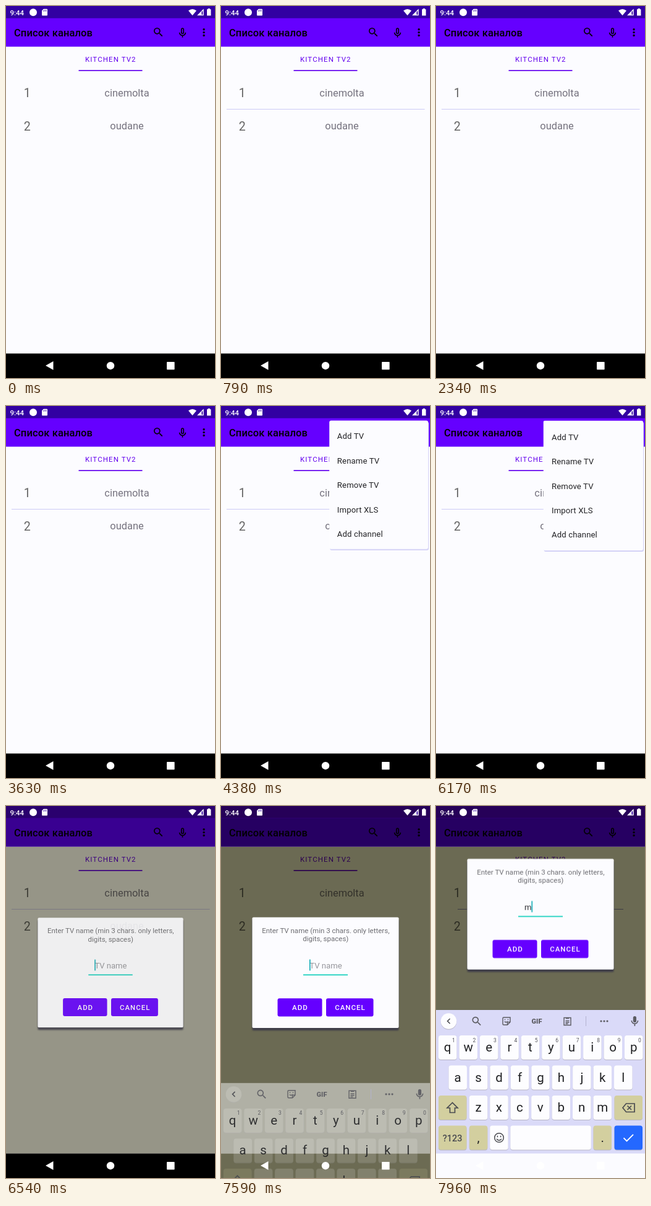
An HTML page for the animation above (8000 ms loop, 338 by 600 pixels).

```html
<!DOCTYPE html>
<html lang="ru">
<head>
<meta charset="utf-8">
<title>Список каналов</title>
<style>
html, body { margin: 0; width: 100%; height: 100%; overflow: hidden; background: #fcfcff; }
svg { display: block; width: 100vw; height: 100vh; }
text { font-family: Roboto, "Noto Sans", sans-serif; white-space: pre; }
.mid { text-anchor: middle; }
.caps { font-size: 11.5px; font-weight: 500; letter-spacing: 1.03px; }
.tab { font-size: 11.5px; letter-spacing: 1.09px; fill: #6200ee; }
.num { font-size: 19.7px; fill: #666; }
.item { font-size: 16.4px; fill: #75727e; }
.menu { font-size: 13.15px; letter-spacing: .12px; fill: #232326; }
.note { font-size: 11.5px; fill: #6d6d72; }
.field { font-size: 13.15px; }
.key { font-size: 20.5px; fill: #202124; }
.hint { font-size: 8.5px; fill: #55555c; }
.line { fill: none; stroke-linecap: butt; }
#dim { mix-blend-mode: multiply; }
#menu { filter: drop-shadow(1.5px 2.5px 0 #d4d2f6); }
#dialog { filter: drop-shadow(0 4px 1px #3f3e49); }
#popIn { transform-origin: 169px 269px; }
#reveal { transform-origin: 0 0; }
</style>
</head>
<body>
<svg viewBox="0 0 338 600" xmlns="http://www.w3.org/2000/svg">
  <defs>
    <clipPath id="menuClip"><rect id="reveal" x="173.5" y="23.5" width="161.5" height="209.5" rx="3"/></clipPath>
    <clipPath id="aboveNav"><rect width="338" height="560.5"/></clipPath>
    <path id="search" d="M15.5 14h-.79l-.28-.27A6.47 6.47 0 0 0 16 9.5 6.5 6.5 0 1 0 9.5 16c1.61 0 3.09-.59 4.23-1.57l.27.28v.79l5 4.99L20.49 19l-4.99-5zm-6 0C7.01 14 5 11.99 5 9.5S7.01 5 9.5 5 14 7.01 14 9.5 11.99 14 9.5 14z"/>
  </defs>

  <g id="app">
    <rect width="338" height="600" fill="#fcfcff"/>
    <rect width="338" height="65.6" fill="#6500ff"/>
    <rect width="338" height="19.7" fill="#3200a2"/>
    <text x="13" y="49" font-size="16.4" font-weight="500" letter-spacing=".15">Список каналов</text>
    <use href="#search" transform="translate(236.5 32.5) scale(.822)"/>
    <g class="line" stroke="#000" stroke-width="1.9" transform="translate(275.6 33.6) scale(.822)">
      <rect x="9.9" y="2.9" width="4.2" height="10.2" rx="2.1"/>
      <path d="M6 11a6 6 0 0 0 12 0M12 17v4"/>
    </g>
    <circle cx="320" cy="37.7" r="1.7"/><circle cx="320" cy="42.6" r="1.7"/><circle cx="320" cy="47.5" r="1.7"/>
    <text class="tab" x="128" y="90">KITCHEN TV2</text>
    <rect x="117.5" y="103.3" width="103" height="1.7" fill="#6200ee"/>
    <text class="num" x="28.8" y="147">1</text>
    <text class="num" x="28.8" y="200.5">2</text>
    <text class="item mid" x="195.5" y="146">cinemolta</text>
    <text class="item mid" x="195.5" y="199.3">oudane</text>
    <rect id="divider" x="9" y="166" width="320.5" height="1" fill="#cdcbf6"/>
  </g>

  <g id="menu"><g clip-path="url(#menuClip)"><g id="menuBody">
    <rect x="173.5" y="23.5" width="161.5" height="209.5" fill="#fcfcff"/>
  </g></g></g>

  <g id="dim">
    <rect width="338" height="19.7" fill="#c2c28a"/>
    <rect y="19.7" width="338" height="45.9" fill="#606062"/>
    <rect y="65.6" width="338" height="495" fill="#6c6b53"/>
  </g>
  <rect id="darkDivider" x="35" y="166" width="268" height="1" fill="#3c3b42"/>

  <g id="status" fill="#fff">
    <text x="6.5" y="14.5" font-size="11.5" font-weight="500">9:44</text>
    <circle cx="44" cy="10.2" r="6"/>
    <path d="M60.8 4.8H66a1 1 0 0 1 1 1V14.5a1 1 0 0 1-1 1H59a1 1 0 0 1-1-1V7.6z"/>
    <path d="M60.6 6.8v2M62.8 6.2v2.6M65 6.2v2.6" stroke="#3200a2" stroke-width=".9"/>
    <path d="M295 7.4Q301.5 2.4 308 7.4L301.5 15.3z"/>
    <path d="M309 15.2L319.6 4.6V15.2z"/>
    <path d="M316.4 9.3V14H318.2V8z" fill="#3200a2"/>
    <path d="M326.6 5.2V4h3.2V5.2h1.6V15.6H325V5.2z"/>
  </g>

  <g id="dialog"><g id="popIn">
    <rect x="50.5" y="179.6" width="237" height="178.4" rx="2" fill="#fcfcff"/>
    <text class="note mid" x="169.3" y="205">Enter TV name (min 3 chars. only letters,</text>
    <text class="note mid" x="169.3" y="218.3">digits, spaces)</text>
    <text id="placeholder" class="field" x="143.2" y="262" fill="#96969c">TV name</text>
    <text id="typed" class="field" x="143" y="262" fill="#333338">m</text>
    <rect id="caret" x="143" y="247.5" width="1.6" height="18" fill="#08a9b4"/>
    <rect x="133" y="271.6" width="72" height="1.6" fill="#03cdb8"/>
    <rect x="91.5" y="310.3" width="72" height="29.3" rx="3" fill="#6500ff"/>
    <rect x="170" y="310.3" width="76.5" height="29.3" rx="3" fill="#6500ff"/>
    <text class="caps mid" x="128" y="329.2" fill="#fff">ADD</text>
    <text class="caps mid" x="209" y="329.2" fill="#fff">CANCEL</text>
  </g></g>

  <g clip-path="url(#aboveNav)"><rect id="panel" y="329" width="338" height="271"/></g>
  <rect id="navBar" y="560.5" width="338" height="39.5"/>
  <g id="keycaps"></g>
  <g id="glyphs"></g>

  <g fill="#fff">
    <path d="M64 580L76.5 573V587z"/>
    <circle cx="169" cy="580.2" r="6.2"/>
    <rect x="260" y="574" width="12.6" height="12.6" rx=".8"/>
  </g>
</svg>
<script>
const LOOP = 8000;
const $ = id => document.getElementById(id);
const add = (id, markup) => $(id).insertAdjacentHTML('beforeend', markup);

// Overflow menu
['Add TV', 'Rename TV', 'Remove TV', 'Import XLS', 'Add channel'].forEach((label, i) =>
  add('menuBody', `<text class="menu" x="187" y="${54.6 + 39.45 * i}">${label}</text>`));

// Keyboard: caps and glyphs fade separately
const PITCH = 33.44, WHITE = '#fdfdff', TAN = '#d3cf9f', EDGE = '#b7b5c6', INK = '#4a4b50', TOOL = '#5c5c62';
const cap = (x, y, w, fill = WHITE) => add('keycaps',
  `<rect x="${x}" y="${y + 1}" width="${w}" height="39" rx="4" fill="${EDGE}"/>
   <rect x="${x}" y="${y}" width="${w}" height="39" rx="4" fill="${fill}"/>`);
const glyph = (cls, ch, x, y) => add('glyphs', `<text class="${cls} mid" x="${x}" y="${y}">${ch}</text>`);
const letter = (ch, x, y, fill) => {
  cap(x, y, 29.5, fill);
  glyph('key', ch, x + 14.7, y + 26);
};
const row = (chars, x, y) => [...chars].forEach((ch, i) => letter(ch, x + PITCH * i, y));
const icon = (d, w = 1.6, color = INK) =>
  add('glyphs', `<path class="line" d="${d}" stroke="${color}" stroke-width="${w}"/>`);

// Tool strip
add('keycaps', `<circle cx="20.5" cy="348" r="12.8" fill="${EDGE}"/><circle cx="20.5" cy="347" r="12.8" fill="${WHITE}"/>`);
icon('M22.6 343l-4 4 4 4');
icon('M109.5 341h10.5v7.5l-4.5 4.5h-6a1.5 1.5 0 0 1-1.5-1.5v-9a1.5 1.5 0 0 1 1.5-1.5zM120 348.5h-4.5v4.5M111 347.5q2 2.5 5 0M111.5 343.8v1.5M116.5 343.8v1.5', 1.4, TOOL);
icon('M207 341.5h11v12h-11zM210 342.5h5M209.5 346.5h6M209.5 349h6M209.5 351.3h4', 1.4, TOOL);
icon('M316.3 346a5.1 5.1 0 0 0 10.2 0M321.4 351v4', 1.6, TOOL);
add('glyphs', `<g fill="${TOOL}">
  <use href="#search" transform="translate(56 337.3) scale(.82)"/>
  <text class="mid" x="163" y="351" font-size="11" font-weight="900">GIF</text>
  ${[267, 272, 277].map(x => `<circle cx="${x}" cy="347" r="1.6"/>`).join('')}
  <rect x="318.8" y="339" width="5.2" height="10" rx="2.6"/>
  <rect x="242" y="339" width="1" height="16" fill="#b3b2d0"/></g>`);

// Rows
row('qwertyuiop', 4, 370);
[...'1234567890'].forEach((n, i) => glyph('hint', n, 28.5 + PITCH * i, 380.5));
row('asdfghjkl', 20.5, 418.5);
row('zxcvbnm', 53.8, 467);
cap(4, 467, 45.5, TAN);
icon('M26.5 478.5l-8.5 8.5h4.5v7.5h8v-7.5h4.5z', 1.7);
cap(288.5, 467, 45.5, TAN);
icon('M307.5 480h13.5v13.5h-13.5l-5.5-6.75zM309.5 483.5l6.5 6.5M316 483.5l-6.5 6.5', 1.7);
cap(4, 515.5, 45.5, TAN);
add('glyphs', `<text class="mid" x="26.7" y="540.5" font-size="14.5" font-weight="500" fill="${INK}">?123</text>`);
letter(',', 53.8, 515.5, TAN);
cap(87.2, 515.5, 29.5);
icon('M94.7 535a7.3 7.3 0 0 1 14.6 0a7.3 7.3 0 0 1-14.6 0zM98 537q4 4.5 8 0M99.4 531.8v2.4M104.6 531.8v2.4', 1.5);
cap(120.3, 515.5, 130.5);
letter('.', 254.5, 515.5, TAN);
cap(288.5, 515.5, 45.5, '#2468ff');
icon('M303.5 535.3l5 5 10.5-10.5', 1.9, '#fff');

// Each step: [ms, value, easing towards the next step]
function play(id, prop, steps) {
  const frame = (ms, value, easing = 'linear') => ({ offset: ms / LOOP, [prop]: value, easing });
  const frames = steps.map(s => frame(...s));
  if (steps[0][0] > 0) frames.unshift(frame(0, steps[0][1]));
  frames.push(frame(LOOP, steps[steps.length - 1][1]));
  $(id).animate(frames, { duration: LOOP, iterations: Infinity });
}
const HOLD = 'step-end', STD = 'cubic-bezier(.4,0,.2,1)', RISE = 'cubic-bezier(.2,0,0,1)';
const OUT = 'cubic-bezier(0,0,.2,1)';

play('divider', 'opacity', [[0, 0, HOLD], [40, 1, HOLD], [6560, 0, HOLD]]);
play('darkDivider', 'opacity', [[0, 0, HOLD], [7680, 1, HOLD]]);

const OPEN = 4168;
play('menu', 'opacity', [[OPEN, 0], [OPEN + 100, 1], [6380, 1], [6480, 0]]);
play('reveal', 'transform', [
  [OPEN, 'translate(270.7px, 22.4px) scale(.192, .153)', STD],
  [OPEN + 250, 'translate(0px, 0px) scale(1, 1)']]);
play('menuBody', 'transform', [
  [OPEN, 'translate(66px, -86px)', STD], [OPEN + 250, 'translate(0px, 0px)']]);

play('dim', 'opacity', [[6400, 0], [6600, 1]]);
play('dialog', 'opacity', [[6400, 0], [6560, 1]]);
play('popIn', 'transform', [[6400, 'scale(.9)', OUT], [6620, 'scale(1)']]);
play('dialog', 'transform', [[7610, 'translateY(0px)', STD], [7820, 'translateY(-94.3px)']]);

play('caret', 'opacity', [[0, 0, HOLD], [6500, 1, HOLD], [7000, 0, HOLD], [7500, 1, HOLD]]);
play('caret', 'transform', [[0, 'translateX(0px)', HOLD], [7920, 'translateX(11.4px)', HOLD]]);
play('placeholder', 'opacity', [[0, 1, HOLD], [7920, 0, HOLD]]);
play('typed', 'opacity', [[0, 0, HOLD], [7920, 1, HOLD]]);

const RAISE = 7527;
for (const id of ['panel', 'keycaps', 'glyphs'])
  play(id, 'transform', [[RAISE, 'translateY(271px)', RISE], [RAISE + 280, 'translateY(0px)']]);
play('panel', 'opacity', [[RAISE, 0], [RAISE + 135, 1]]);
play('panel', 'fill', [[7590, '#fdfcff'], [7720, '#dadaf8']]);
play('keycaps', 'opacity', [[RAISE, 0], [7590, .15], [7720, 1]]);
play('glyphs', 'opacity', [[RAISE, 0], [7580, .9], [7680, 1]]);
play('navBar', 'fill', [[0, '#000', HOLD], [7530, '#6c6b53', HOLD], [7680, '#6c6b53'], [7850, '#fbfbff']]);
</script>
</body>
</html>
```
